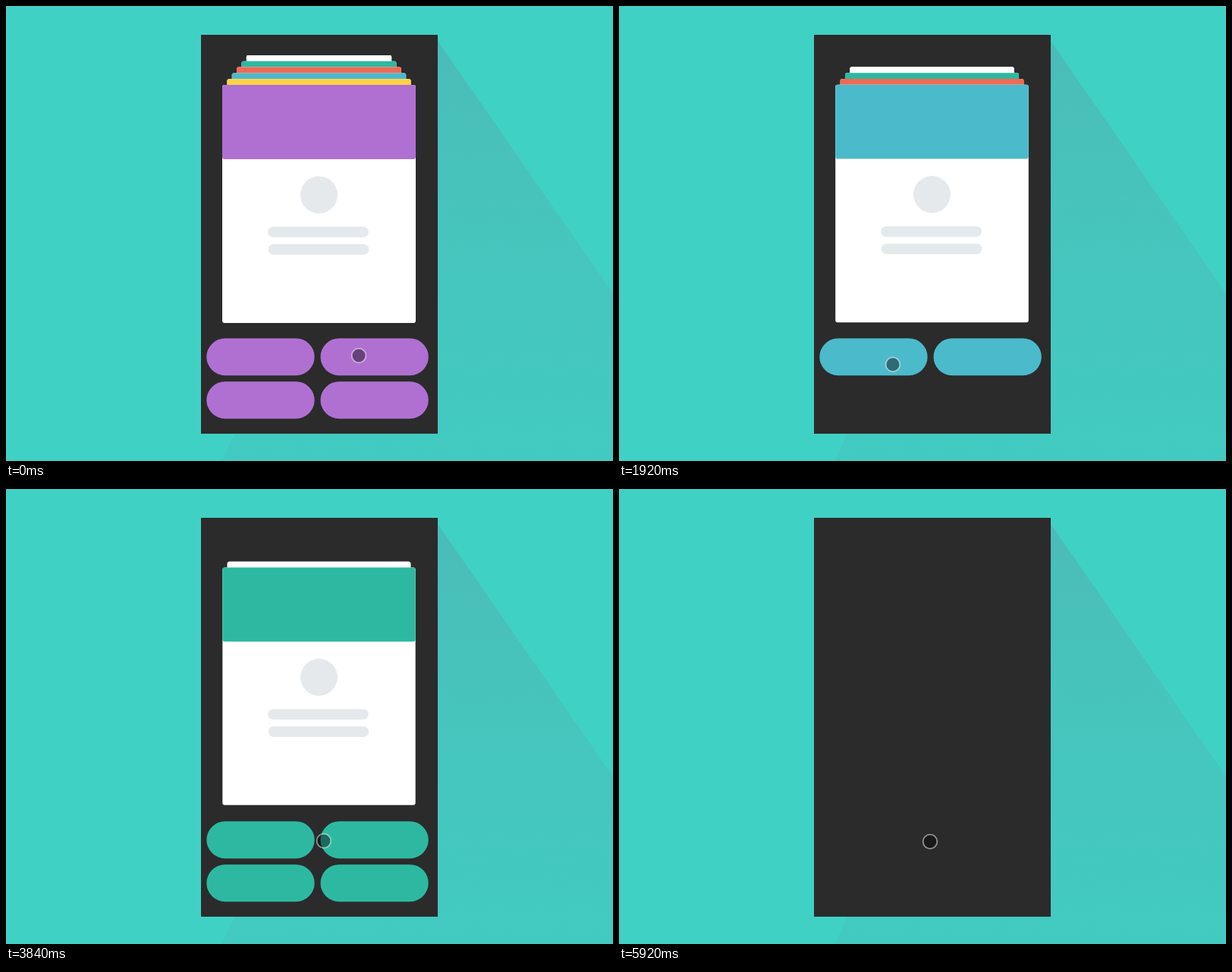
An HTML page with a canvas that plays this animation: 800 by 600 pixels, repeating every 5960 ms.

```html
<!DOCTYPE html>
<html lang="en">
<head>
<meta charset="utf-8">
<title>Card stack</title>
<style>
  html, body { margin: 0; width: 100%; height: 100%; overflow: hidden; background: #40d1c5; }
  canvas { display: block; }
</style>
</head>
<body>
<canvas id="stage" width="800" height="600"></canvas>
<script>
const ctx = document.getElementById('stage').getContext('2d');
const LOOP = 5960, TICK = 40, TWEEN = 600;
const STACK_DELAY = 118, PRESS_LEAD = 160;
const PILL_SLIDE = 311, CARD_SLIDE = 400;
const PHONE = { x: 257, y: 38, w: 312, h: 526 };
const GREY = '#e6e9ec';

// leave: when the card and its pills slide out and the next set comes in
const cards = [
  { color: '#b070d2', pills: 4, leave: 312 },
  { color: '#fdd245', pills: 4, leave: 1312 },
  { color: '#4bbacb', pills: 2, leave: 2272 },
  { color: '#f06a54', pills: 2, leave: 3257 },
  { color: '#2db9a1', pills: 4, leave: 4232 },
  { color: '#ffffff', pills: 1, leave: 5117, pillColor: '#1a80d4' }
];
cards.forEach((card, i) => card.enter = i ? cards[i - 1].leave : -LOOP);

// time, x, y
const pointerPath = [
  [0, 465, 461], [1220, 465, 461], [1900, 361, 473], [2080, 358.5, 465],
  [3160, 358.5, 465], [3760, 419, 464], [4120, 418, 464], [4720, 409, 465],
  [5919, 409, 465], [5920, 410, 465]
];

const clamp = v => Math.max(0, Math.min(1, v));
const span = (t, start, length) => clamp((t - start) / length);
const tween = (t, start) => 1 - (1 - span(t, start, TWEEN)) ** 2;

function pointerAt(t) {
  let i = 0;
  while (i < pointerPath.length - 2 && t >= pointerPath[i + 1][0]) i++;
  const [t0, x0, y0] = pointerPath[i], [t1, x1, y1] = pointerPath[i + 1];
  const u = span(t, t0, t1 - t0), k = u * u * (3 - 2 * u);
  return [x0 + (x1 - x0) * k, y0 + (y1 - y0) * k];
}

function rounded(x, y, w, h, r, color) {
  ctx.beginPath();
  ctx.roundRect(x, y, w, h, r);
  ctx.fillStyle = color;
  ctx.fill();
}

function disc(x, y, r, color) {
  ctx.beginPath();
  ctx.arc(x, y, r, 0, Math.PI * 2);
  ctx.fillStyle = color;
  ctx.fill();
}

function drawBackdrop() {
  ctx.fillStyle = '#40d1c5';
  ctx.fillRect(0, 0, 800, 600);
  const shade = ctx.createLinearGradient(0, 46, 0, 600);
  shade.addColorStop(0, '#4bbcb8');
  shade.addColorStop(0.45, '#46c5bd');
  shade.addColorStop(1, '#42cac1');
  ctx.fillStyle = shade;
  ctx.beginPath();
  [[569, 46], [800, 379], [800, 600], [284, 600], [302, 563], [569, 563]]
    .forEach(p => ctx.lineTo(...p));
  ctx.fill();
  ctx.fillStyle = '#2b2b2b';
  ctx.fillRect(PHONE.x, PHONE.y, PHONE.w, PHONE.h);
}

function drawCard(card, depth, dx) {
  const scale = 1 - 0.05 * depth;
  ctx.save();
  ctx.translate(412.5 + dx, 104 - 7.8 * depth);
  ctx.scale(scale, scale);
  rounded(-127.5, 0, 255, 314, 3, '#fff');
  rounded(-127.5, 0, 255, 98, 3, card.color);
  disc(0, 145, 24.5, GREY);
  rounded(-67.5, 187, 133, 14, 7, GREY);
  rounded(-67, 210, 133, 14, 7, GREY);
  ctx.restore();
}

function drawCards(t) {
  const shift = cards.slice(0, -1)
    .reduce((sum, card) => sum + tween(t, card.leave + STACK_DELAY), 0);
  for (let i = cards.length - 1; i >= 0; i--) {
    const out = tween(t, cards[i].leave);
    if (out < 1) drawCard(cards[i], Math.max(0, i - shift), -CARD_SLIDE * out);
  }
}

function drawPills(card, t) {
  const shown = tween(t, card.enter), out = tween(t, card.leave);
  if (shown === 0 || out === 1) return;
  const scale = 0.5 + 0.5 * shown;
  const cx = card.pills === 1 ? 419 : 410.5;
  const cy = card.pills === 4 ? 491 : 462.5;
  const shape = new Path2D();
  for (let n = 0; n < card.pills; n++) {
    const x = card.pills === 1 ? 348 : 264.3 + 150.2 * (n % 2);
    shape.roundRect(x - cx, 438.2 + 57 * (n >> 1) - cy, 142.3, 49, 24.5);
  }
  ctx.save();
  ctx.translate(cx - PILL_SLIDE * out, cy);
  ctx.scale(scale, scale);
  ctx.globalAlpha = shown;
  ctx.fillStyle = card.pillColor || card.color;
  ctx.fill(shape);
  const pressed = card.leave - PRESS_LEAD, press = span(t, pressed, 320);
  if (press > 0 && press < 1) {
    const [px, py] = pointerAt(pressed);
    ctx.clip(shape);
    disc(px - 1 - cx, py - 2 - cy, 100 * press, `rgba(255,255,255,${0.28 * (1 - press)})`);
  }
  ctx.restore();
}

function drawPointer(t) {
  const [x, y] = pointerAt(t);
  disc(x, y, 9.3, 'rgba(0,0,0,.42)');
  ctx.lineWidth = 1.8;
  ctx.strokeStyle = 'rgba(255,255,255,.5)';
  ctx.stroke();
}

function draw(t) {
  drawBackdrop();
  ctx.save();
  ctx.beginPath();
  ctx.rect(PHONE.x, PHONE.y, PHONE.w, PHONE.h);
  ctx.clip();
  drawCards(t);
  for (let i = cards.length - 1; i >= 0; i--) drawPills(cards[i], t);
  drawPointer(t);
  ctx.restore();
}

const began = performance.now();
function frame() {
  const t = (performance.now() - began) % LOOP;
  draw(Math.floor(t / TICK) * TICK);
  requestAnimationFrame(frame);
}
frame();
</script>
</body>
</html>
```
